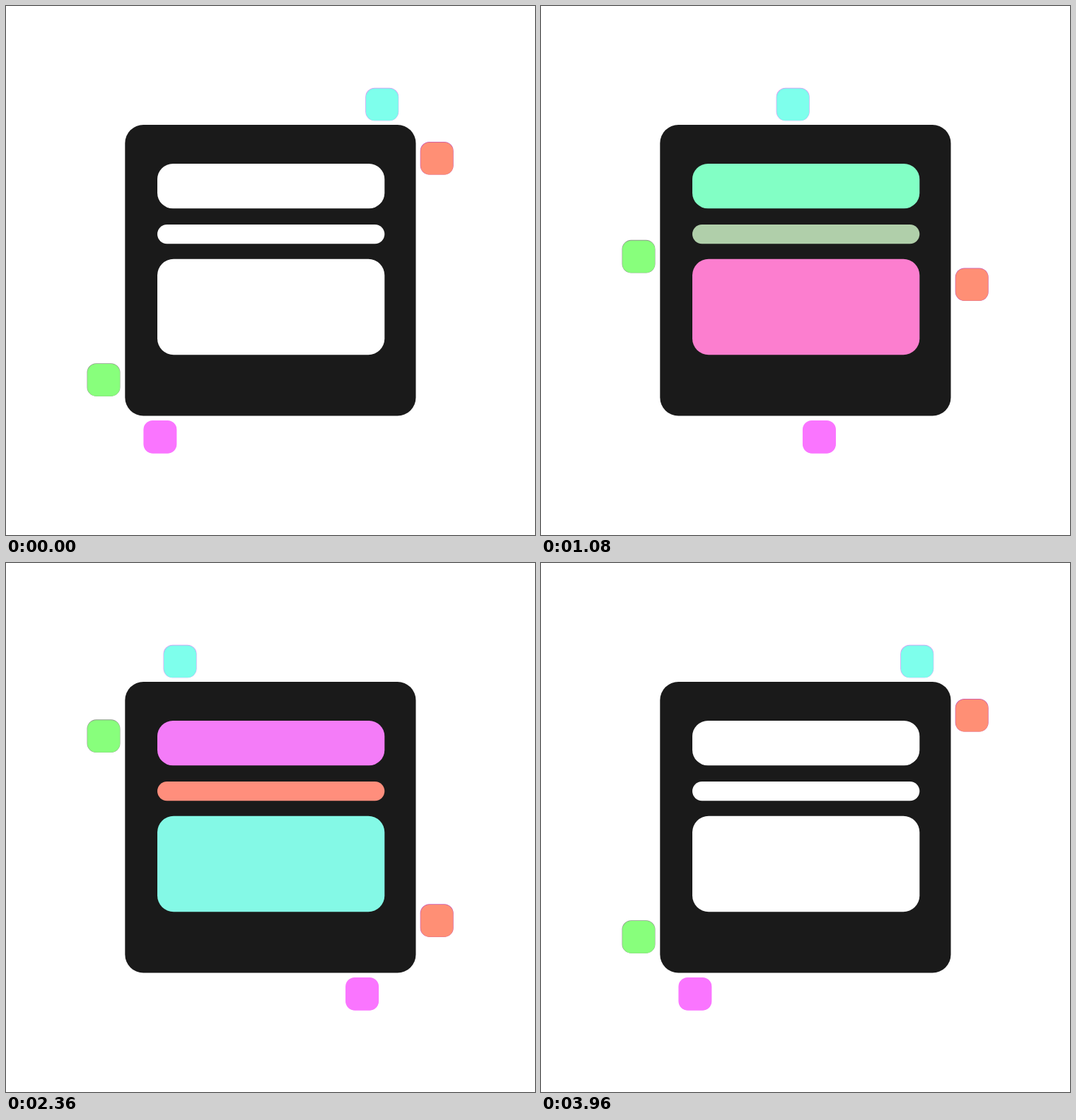
These frames come from a looping animation (748 by 748 pixels, 4.04 s). An HTML page:

```html
<!DOCTYPE html>
<html lang="en">
<head>
<meta charset="utf-8">
<title>Colour panel</title>
<style>
  html, body { margin: 0; height: 100%; overflow: hidden; background: #fff; }
  svg { display: block; width: 100%; height: 100%; }
</style>
</head>
<body>
<svg viewBox="0 0 748 748">
  <rect x="168.3" y="168" width="411.2" height="411.5" rx="26" fill="#1a1a1a"/>
  <g id="bars">
    <rect x="214" y="223" width="321.3" height="63.3" rx="22"/>
    <rect x="214" y="309" width="321.3" height="27.2" rx="13.6"/>
    <rect x="214" y="357.8" width="321.3" height="135.5" rx="23"/>
  </g>
  <g id="tiles"></g>
</svg>
<script>
const FRAME = 40, LOOP = 4040, TURN = 2000, END = 3960;
const white = [255, 255, 255], cyan = [126, 255, 236], green = [136, 255, 124],
      pink = [250, 117, 255], orange = [255, 143, 117];

const barColors = [
  [white, cyan, green, pink, orange, white],
  [white, green, pink, orange, cyan, white],
  [white, pink, orange, cyan, green, white]
];
const colorTimes = [0, 800, 1600, 2400, 3200, END];

// Each tile slides along one side of the panel; rim is its thin edge colour.
const tiles = [
  { x: 508.2, y: 115.7, dx: -313.5, dy: 0, color: cyan, rim: '#dc8cf5' },
  { x: 585.7, y: 192, dx: 0, dy: 318.6, color: orange, rim: '#c552b4' },
  { x: 194.4, y: 586, dx: 313.5, dy: 0, color: pink, rim: '#fa75ff' },
  { x: 114.5, y: 505.3, dx: 0, dy: -311.6, color: green, rim: '#8f9a8c' }
];

const rgb = c => `rgb(${c.map(Math.round)})`;
const smooth = p => p * p * (3 - 2 * p);

function addRect(parent, x, y, width, height, rx, fill) {
  const rect = document.createElementNS('http://www.w3.org/2000/svg', 'rect');
  const attrs = { x, y, width, height, rx, fill };
  for (const name in attrs) rect.setAttribute(name, attrs[name]);
  parent.append(rect);
}

for (const tile of tiles) {
  tile.node = document.createElementNS('http://www.w3.org/2000/svg', 'g');
  addRect(tile.node, 0, 0, 47, 46.6, 13, tile.rim);
  addRect(tile.node, 0.6, 0.8, 46, 45.6, 12.5, rgb(tile.color));
  document.getElementById('tiles').append(tile.node);
}
const bars = [...document.getElementById('bars').children];

function colorAt(colors, t) {
  const i = Math.min(4, Math.floor(t / 800));
  const p = (t - colorTimes[i]) / (colorTimes[i + 1] - colorTimes[i]);
  return rgb(colors[i].map((v, k) => v + (colors[i + 1][k] - v) * p));
}

const start = performance.now();
function draw() {
  const elapsed = (performance.now() - start) % LOOP;
  const t = Math.min(END, Math.floor(elapsed / FRAME) * FRAME);
  const travel = smooth(t < TURN ? t / TURN : (END - t) / (END - TURN));
  for (const { node, x, y, dx, dy } of tiles)
    node.setAttribute('transform', `translate(${x + dx * travel} ${y + dy * travel})`);
  bars.forEach((bar, i) => bar.setAttribute('fill', colorAt(barColors[i], t)));
  requestAnimationFrame(draw);
}
draw();
</script>
</body>
</html>
```
